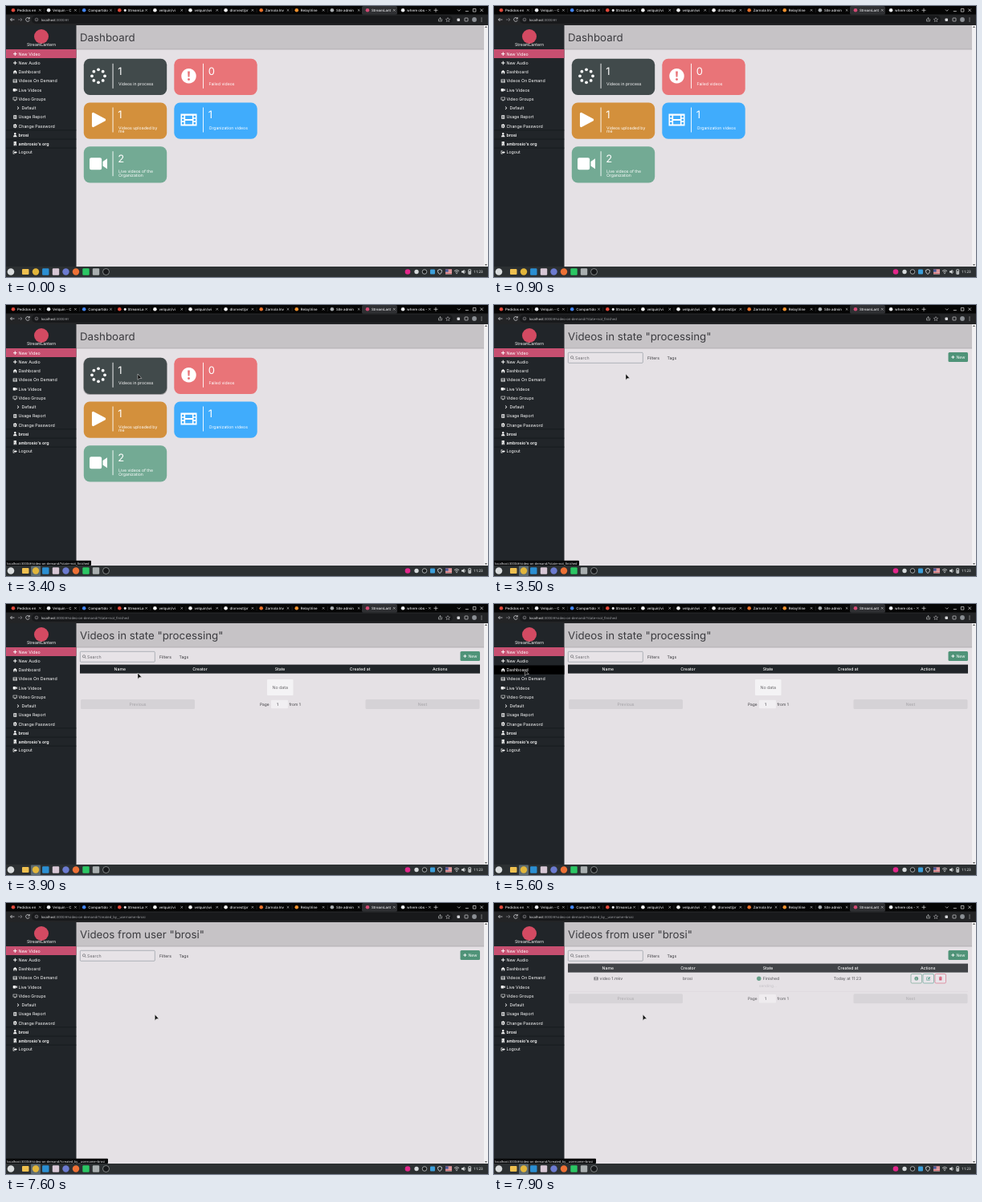
Recreate the animation shown at these times as an HTML page. Size 600 by 338 pixels, loop 8 s.

```html
<!DOCTYPE html>
<html lang="en">
<head>
<meta charset="utf-8">
<title>Video dashboard</title>
<style>
html, body { margin: 0; width: 100%; height: 100%; overflow: hidden; background: #e5e1e5; }
svg { display: block; width: 100%; height: 100%; font-family: Inter, sans-serif; text-rendering: geometricPrecision; }
.ui { font-family: "Noto Sans", sans-serif; }
</style>
</head>
<body>
<svg id="stage" viewBox="0 0 600 338"></svg>
<script>
const LOOP = 8000, STEP = 100;
const PAGE = '#e5e1e5', DARK = '#212529', GREEN = '#4f9378', INK = '#3b3b3f';

// Icons live in a 16 x 16 box, holes by even-odd fill
const icons = {
  plus: 'M6.5 1h3v5.5H15v3H9.5V15h-3V9.5H1v-3h5.5z',
  home: 'M8 1 0 8h2v7h4v-5h4v5h4V8h2z',
  film: 'M0 2h16v12H0zM4.5 3.7v3.5h7V3.7zM4.5 8.8v3.5h7V8.8zM1.2 3.7h2v2h-2zM1.2 7h2v2h-2zM1.2 10.3h2v2h-2zM12.8 3.7h2v2h-2zM12.8 7h2v2h-2zM12.8 10.3h2v2h-2z',
  camera: 'M1.5 2.5h8q1.5 0 1.5 1.5v8q0 1.5-1.5 1.5h-8Q0 13.5 0 12V4q0-1.5 1.5-1.5zM12 6l4-2.7v9.4L12 10z',
  screen: 'M0 1h16v11H0zM1.7 2.7v7.6h12.6V2.7zM5 13h6v2H5z',
  chevron: 'M5 2l6 6-6 6-1.5-1.5L8 8 3.5 3.5z',
  report: 'M2 1h12v14H2zM4 4v1.5h8V4zM4 7.3v1.5h8V7.3zM4 10.6v1.5h8v-1.5z',
  gear: 'M6.5 0h3v2l2 1 2-1L15 4.5 13.5 6v4l1.5 1.5-1.5 2.5-2-1-2 1v2h-3v-2l-2-1-2 1L1 11.5 2.5 10V6L1 4.5 2.5 2l2 1 2-1zM8 5.5a2.5 2.5 0 1 0 .01 0z',
  user: 'M8 0a4 4 0 1 1-.01 0zM1 16q0-7 7-7t7 7z',
  building: 'M3 0h10v16H3zM5 2v2h2V2zM9 2v2h2V2zM5 6v2h2V6zM9 6v2h2V6zM7 11v5h2v-5z',
  logout: 'M0 2h6v2H2v8h4v2H0zM9 3l7 5-7 5v-3H4V6h5z',
  search: 'M6.5 0a6.5 6.5 0 1 0 .01 0zM6.5 2a4.5 4.5 0 1 1-.01 0zM11 12.5l1.5-1.5L16 14.5 14.5 16z',
  play: 'M2.5 0Q1 0 1 1.5v13Q1 16 2.5 16L15.5 9q1-1 0-2z',
  alert: 'M8 0a8 8 0 1 0 .01 0zM6.8 3h2.4l-.4 6H7.2zM8 10.3a1.3 1.3 0 1 0 .01 0z',
  info: 'M8 0a8 8 0 1 0 .01 0zM7 3h2v2H7zM7 6.5h2V13H7z',
  edit: 'M0 2h9v2H2v10h10V9h2v7H0zM5 9l8-8 3 3-8 8H5z',
  trash: 'M1 2h4V0h6v2h4v2H1zM2 5h12l-1 11H3z'
};

const rect = (x, y, w, h, fill, r = 0, more = '') =>
  `<rect x="${x}" y="${y}" width="${w}" height="${h}" rx="${r}" fill="${fill}" ${more}/>`;
const dot = (x, y, r, fill, more = '') => `<circle cx="${x}" cy="${y}" r="${r}" fill="${fill}" ${more}/>`;
const line = (d, color, w = .7) => `<path d="${d}" fill="none" stroke="${color}" stroke-width="${w}"/>`;
const text = (x, y, str, size = 5.3, fill = '#fff', more = '') =>
  `<text x="${x}" y="${y}" font-size="${size}" fill="${fill}" ${more}>${str}</text>`;
const label = (x, y, str, size, fill, more = '') => text(x, y, str, size, fill, 'text-anchor="middle" ' + more);
const icon = (name, x, y, size, fill = '#fff') =>
  `<path transform="translate(${x - size / 2} ${y - size / 2}) scale(${size / 16})" d="${icons[name]}" fill="${fill}" fill-rule="evenodd"/>`;

const tabs = [
  ['Pedidos en', '#e0493c'], ['Velquin - C', '#e8eaed'], ['Compartido', '#4285f4'], ['● StreamLa', '#e2483a'],
  ['velquin/vi', '#f1f1f1'], ['velquin/wi', '#f1f1f1'], ['dlorvest/pr', '#f1f1f1'], ['Zarnola Inv', '#e8702a'],
  ['RelayVine', '#f0912e'], ['Site admin', '#a9adb0'], ['StreamLant', '#d24a74'], ['where obs -', '#eceef0']
];
const menu = [
  ['plus', 'New Video'], ['plus', 'New Audio'], ['home', 'Dashboard'], ['film', 'Videos On Demand'],
  ['camera', 'Live Videos'], ['screen', 'Video Groups'], ['chevron', 'Default'], ['report', 'Usage Report'],
  ['gear', 'Change Password'], ['user', 'brosi'], ['building', "ambrosio's org"], ['logout', 'Logout']
];
const ROW = 11.25, MENU_TOP = 54;

const HOST = 'localhost:3000';
const STATE_PATH = '/#/video-on-demand/?state=not_finished';
const USER_PATH = '/#/video-on-demand/?created_by__username=brosi';

// Pointer tip: time, x, y
const pointerKeys = [
  [1000, 124, 328], [1700, 39, 240], [1900, 39, 240], [2700, 160, 83], [3000, 164, 86], [4800, 164, 86],
  [5600, 38.5, 82], [5700, 38.5, 82], [6000, 42, 83.5], [6700, 42, 83.5], [7400, 185.3, 139], [LOOP, 185.3, 139]
];
function pointerAt(t) {
  const i = pointerKeys.findIndex(k => k[0] > t);
  if (i < 1) return null;
  const [t0, x0, y0] = pointerKeys[i - 1], [t1, x1, y1] = pointerKeys[i];
  const u = (t - t0) / (t1 - t0), e = u * u * (3 - 2 * u);
  return { x: x0 + (x1 - x0) * e, y: y0 + (y1 - y0) * e };
}

function browser(path) {
  let s = rect(0, 0, 600, 11, '#050505') + rect(443, 0, 44, 11, '#2f3033', 2) + rect(0, 10.5, 600, 13.5, '#232426') +
    rect(32, 12, 524, 10, '#18191b', 5);
  tabs.forEach(([name, color], i) => {
    const x = 9 + 44.1 * i;
    s += dot(x, 5.3, 2.3, color) + text(x + 5, 6.9, name, 4.4, '#e4e5e8', 'font-weight="500"') +
      line(`M${x + 32} 4l2.6 2.6m0-2.6l-2.6 2.6`, '#c8c9cc', .6);
    if (i < 9) s += line(`M${x + 38.5} 3v5`, '#444548', .4);
  });
  return s + line('M532.500 5.300h5m-2.500-2.500v5'.replace(/00/g, ''), '#ddd') +
    line('M562 4.5l1.8 1.8 1.8-1.8M571.8 6.5h4M581.3 3.5h3.6v3.6h-3.6zM590.3 3.5l3.6 3.6m0-3.6l-3.6 3.6', '#ddd') +
    line('M10.5 17h-5m2-2-2 2 2 2', '#e4e5e8') + line('M15 17h5m-2-2 2 2-2 2', '#85868a') +
    line('M29 15.5a2.4 2.4 0 1 0 .3 2.2M29.3 14v2h-2', '#e4e5e8') +
    dot(38, 17, 1.9, 'none', 'stroke="#b6b7ba" stroke-width=".5"') + line('M38 16.7v1.3', '#b6b7ba', .5) +
    text(44, 18.5, `${HOST.slice(0, 9)}<tspan fill="#a2a4a8">${HOST.slice(9)}${path}</tspan>`, 4.2, '#f0f0f2', 'class="ui"') +
    line('M538.5 16v3h4v-3M540.5 18v-3.5l-1.2 1.2m1.2-1.2 1.2 1.2', '#c8c9cc', .6) +
    line('M550 14.5l.8 1.7 1.8.2-1.3 1.3.3 1.8-1.6-.9-1.6.9.3-1.8-1.3-1.3 1.8-.2z', '#c8c9cc', .5) +
    rect(561.5, 15.5, 3.5, 3.5, '#d5d6d9', .8) + rect(571, 15, 4, 4, 'none', .5, 'stroke="#d5d6d9" stroke-width=".7"') +
    dot(583, 17, 2.9, '#8b8f94') + [15, 17, 19].map(y => dot(592, y, .55, '#ddd')).join('');
}

function sidebar(pointer) {
  let s = rect(0, 24, 87.5, 301, DARK) + dot(44, 38, 9, '#d34a62') +
    label(44, 50.3, 'StreamLantern', 5.2, '#fff') + rect(0, MENU_TOP, 87.5, 11, '#c74f70');
  const hovered = pointer && pointer.x < 87 ? Math.floor((pointer.y - MENU_TOP) / ROW) : -1;
  if (hovered > 0 && hovered < 9) s += rect(0, MENU_TOP + ROW * hovered, 87.5, ROW, '#000');
  menu.forEach(([name, title], i) => {
    const y = 59.7 + ROW * i - Math.max(0, i - 8) * .3, inset = i === 6 ? 4 : 0;
    s += icon(name, 11.3 + inset, y, 5.2) +
      text(15.4 + inset, y + 1.9, title, 5.3, '#fff', i === 9 || i === 10 ? 'font-weight="600"' : '');
  });
  return s + [154.7, 165.8, 176.8].map(y => rect(0, y, 87.5, .5, '#0d0f11')).join('');
}

function dashboard(inProcess, pointer) {
  const cards = [
    [inProcess, '#414a4b', '', 'Videos in process'], [0, '#e97478', 'alert', 'Failed videos'],
    [1, '#d3903c', 'play', 'Videos uploaded by', 'me'], [1, '#40acfc', 'film', 'Organization videos'],
    [2, '#73aa94', 'camera', 'Live videos of the', 'Organization']
  ];
  return cards.map(([count, color, name, ...lines], i) => {
    const x = 96.8 + 112.5 * (i % 2), y = 65.8 + 54.7 * (i >> 1);
    const over = pointer && pointer.x > x && pointer.x < x + 103 && pointer.y > y && pointer.y < y + 45;
    let s = (over ? rect(x - .6, y, 104.6, 46.2, 'rgba(0,0,0,.3)', 8) : '') + rect(x, y, 103.4, 45.2, color, 7.5);
    if (name) s += icon(name, x + 18.2, y + 21.5, name === 'camera' ? 22 : name === 'film' ? 20 : 18.5);
    else for (let k = 0; k < 8; k++)
      s += dot(x + 18.2 + 8 * Math.cos(k * Math.PI / 4), y + 21.5 + 8 * Math.sin(k * Math.PI / 4), 1.9, '#fff');
    s += rect(x + 35.8, y + 6, .9, 31, '#fff') + text(x + 42.5, y + 19.7, count, 13);
    return s + lines.map((str, k) => text(x + 43.2, y + 33.2 + k * 4.5, str, 5.15)).join('');
  }).join('');
}

function pager(y) {
  const button = (x, w, title) => rect(x, y, w, 12, '#d5d2d6', 1.5) + label(x + w / 2, y + 7.9, title, 5.2, '#a3a1a5');
  return button(93, 142, 'Previous') + button(447.5, 142, 'Next') +
    text(316, y + 7.7, 'Page', 4.9, INK) + rect(330, y + .8, 21, 10.5, '#f1eff2', 1) +
    label(338, y + 7.7, '1', 4.9, INK) + text(352.5, y + 7.7, 'from 1', 4.9, INK);
}

function videoRow() {
  let s = icon('film', 127, 94.3, 5, INK) + text(131.5, 96, 'video 1.mkv', 5.15, INK) + label(241, 96, 'brosi', 5.15, INK) +
    dot(329.8, 94.2, 2.7, GREEN) + text(334.7, 96, 'Finished', 5.15, INK) +
    label(341, 104.7, 'sending...', 4.8, '#bebbc0') + label(440, 96, 'Today at 11:23', 5.15, INK);
  [['info', GREEN], ['edit', '#37917c'], ['trash', '#d54766']].forEach(([name, color], i) => {
    const x = 519 + 15 * i;
    s += rect(x, 88.5, 13.5, 11.5, '#eae6eb', 1.5, `stroke="${color}" stroke-width=".6"`) + icon(name, x + 6.8, 94.2, 4.8, color);
  });
  return s + rect(92, 110.5, 498, .4, '#d3d0d4');
}

function listing(hasVideo, opacity) {
  const heads = ['Name', 'Creator', 'State', 'Created at', 'Actions'];
  const table = rect(92, 75.6, 498, 11, DARK) +
    heads.map((h, i) => label(141.8 + 99.6 * i, 83, h, 5.15, '#fff', 'font-weight="500"')).join('') +
    (hasVideo ? videoRow() + pager(113.3)
      : rect(325, 94, 32.5, 20, '#f4f3f5', 1) + label(341.2, 105.9, 'No data', 5.3, '#68676b') + pager(119));
  return rect(92.3, 59.3, 93, 13, '#e7e3e7', 1, 'stroke="#858e95" stroke-width=".6"') +
    icon('search', 97.5, 65.8, 4.6, '#55565a') + text(101, 67.6, 'Search', 5.3, '#6c6b70') +
    text(191, 67.6, 'Filters', 5.15, INK) + text(215.5, 67.6, 'Tags', 5.15, INK) +
    rect(565.5, 59, 24.5, 12, GREEN, 1.5) + icon('plus', 571.3, 65, 4.5) + text(575.4, 66.9, 'New', 5.15) +
    `<g opacity="${opacity}">${table}</g>`;
}

function taskbar(active) {
  const ring = (x, r, fill, color) => dot(x, 331.5, r, fill, `stroke="${color}" stroke-width=".7"`);
  const tile = (x, color) => rect(x - 4.2, 327.3, 8.4, 8.4, color, 1.2);
  let s = rect(0, 325, 600, 13, '#2c3032') + dot(6, 331.5, 4.3, '#d9dcdd') +
    (active ? rect(31, 325.5, 12, 12.5, '#5d6b70', 1) : '') +
    rect(20, 328, 8.5, 7, '#efc04f', 1) + dot(37, 331.5, 4.2, '#e2b63b') +
    tile(49.3, '#2b8fd3') + tile(62, '#d8c8d6') + dot(74.5, 331.5, 4.2, '#6c7bd0') + dot(87, 331.5, 4.2, '#ee7136') +
    tile(99.5, '#2bc764') + tile(112, '#a9afb0') + ring(124.5, 4, '#17191b', '#a8acae');
  s += dot(500, 331.5, 3.3, '#e3268b') + dot(511, 331.5, 2.7, '#d5d9db') + ring(521, 2.8, '#1b1d1e', '#d5d9db') +
    rect(528, 328.5, 6, 6, '#3c9fdb', 1) + line('M540 328.5l2.4 1v2q-.4 2-2.4 3-2-1-2.4-3v-2z', '#d5d9db', .9);
  s += rect(547, 328.5, 8, 6, '#f3ecec');
  for (let i = 0; i < 4; i++) s += rect(547, 328.5 + 1.6 * i, 8, .8, '#c8434c');
  return s + rect(547, 328.5, 3.6, 3.2, '#465899') +
    line('M558 330.5q3-2.6 6 0M559.3 332q1.7-1.5 3.4 0', '#e0e3e4', .8) + dot(561, 333.5, .7, '#e0e3e4') +
    '<path d="M567 330.5h1.5l2-1.8v5.6l-2-1.8H567z" fill="#e0e3e4"/>' + line('M571.3 330q1 1.5 0 3', '#e0e3e4', .5) +
    rect(575.7, 328.7, 3, 5.8, 'none', .5, 'stroke="#e0e3e4" stroke-width=".8"') + rect(576.5, 330.5, 1.4, 3.5, '#e0e3e4') +
    text(582, 333.2, '11:23', 4.6, '#eceeef', 'class="ui"');
}

function statusBar(path, width) {
  return rect(-1, 318.8, width + 1, 6.3, '#08090a', 1) + text(1.2, 323.5, HOST + path, 3.95, '#e8e9eb', 'class="ui"');
}

function scene(t) {
  const pointer = pointerAt(t);
  const onState = t >= 3500 && t < 5800, onUser = t >= 7600;
  const path = onState ? STATE_PATH : onUser ? USER_PATH : '/#/';
  const title = onState ? 'Videos in state "processing"' : onUser ? 'Videos from user "brosi"' : 'Dashboard';
  const shown = t - (onUser ? 7800 : 3700);
  const opacity = shown < 0 ? 0 : Math.min(1, .5 + shown / 300);

  let s = rect(0, 0, 600, 338, PAGE) + rect(87, 24, 508, 30, '#c6c3c6') + rect(87, 53.6, 508, .8, '#aaa7aa') +
    rect(595, 24, 5, 301, '#f1f0f2') + '<path d="M596 27l1.5-2 1.5 2zM596 322l1.5 2 1.500-2z" fill="#555"/>'.replace('1.500', '1.5') +
    text(92, 43.7, title, 13.3, INK) +
    (onState || onUser ? listing(onUser, opacity) : dashboard(t < 5800 ? 1 : 0, pointer)) +
    browser(path) + sidebar(pointer);
  if (t >= 2800 && t < 3800) s += statusBar(STATE_PATH, 106);
  if (t >= 5900 && t < 7000) s += statusBar('/#/', 38);
  if (t >= 7300) s += statusBar(USER_PATH, 127);
  s += taskbar(t >= 1000);
  if (pointer) s += `<path transform="translate(${pointer.x} ${pointer.y})" d="M0 0v7.4l2-1.9h2.900z" fill="#080808" stroke="#e6e6e6" stroke-width=".5"/>`;
  return s;
}

const stage = document.getElementById('stage');
let drawn = -1;
const begin = performance.now();
function tick() {
  const t = Math.floor((performance.now() - begin) % LOOP / STEP) * STEP;
  if (t !== drawn) stage.innerHTML = scene(drawn = t);
  requestAnimationFrame(tick);
}
tick();
</script>
</body>
</html>
```
